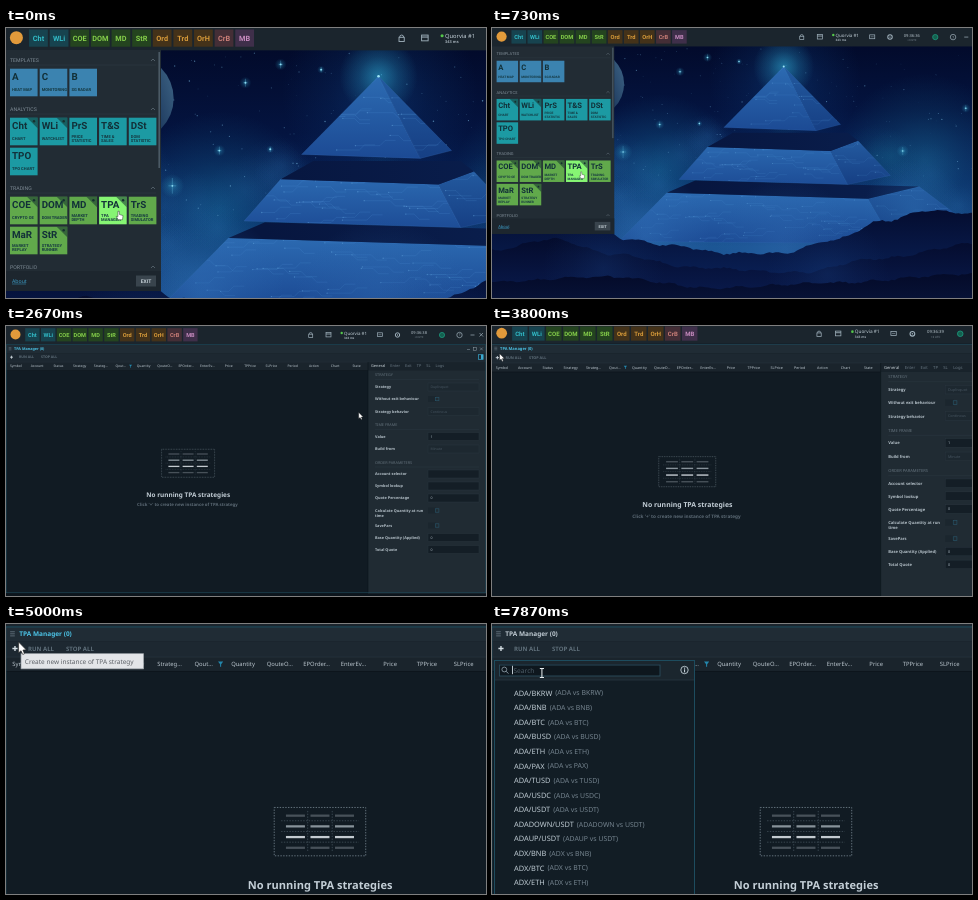
An HTML page with a canvas that plays this animation: 480 px wide and 270 px high, repeating every 8 s.

```html
<!DOCTYPE html>
<html lang="en">
<head>
<meta charset="utf-8">
<title>Trading terminal</title>
<style>
html, body { margin: 0; width: 100%; height: 100%; overflow: hidden; background: #0a1a3c; }
canvas { display: block; width: 100vw; height: 100vh; }
</style>
</head>
<body>
<canvas id="stage"></canvas>
<script>
const LOOP = 8000;
const canvas = document.getElementById('stage');
const dpr = window.devicePixelRatio || 1;
canvas.width = 480 * dpr;
canvas.height = 270 * dpr;
const ctx = canvas.getContext('2d');

// ---------- helpers ----------
const clamp = v => Math.max(0, Math.min(1, v));
const ease = v => (1 - Math.cos(Math.PI * clamp(v))) / 2;
const mix = (a, b, p) => a + (b - a) * p;
const noise = n => { const v = Math.sin(n * 127.1 + 11.7) * 43758.5453; return v - Math.floor(v); };

function rect(x, y, w, h, color) {
  ctx.fillStyle = color;
  ctx.fillRect(x, y, w, h);
}
function frame(x, y, w, h, color, width = .5) {
  ctx.strokeStyle = color;
  ctx.lineWidth = width;
  ctx.strokeRect(x, y, w, h);
}
function circle(x, y, r, fill, stroke, width = .7) {
  ctx.beginPath();
  ctx.arc(x, y, r, 0, 7);
  if (fill) { ctx.fillStyle = fill; ctx.fill(); }
  if (stroke) { ctx.strokeStyle = stroke; ctx.lineWidth = width; ctx.stroke(); }
}
function path(points, closed) {
  ctx.beginPath();
  points.forEach(([x, y]) => ctx.lineTo(x, y));
  if (closed) ctx.closePath();
}
function poly(points, fill) {
  path(points, true);
  ctx.fillStyle = fill;
  ctx.fill();
}
function line(points, color, width = .7) {
  path(points);
  ctx.strokeStyle = color;
  ctx.lineWidth = width;
  ctx.stroke();
}
function gradient(x0, y0, x1, y1, ...colors) {
  const g = ctx.createLinearGradient(x0, y0, x1, y1);
  colors.forEach((c, i) => g.addColorStop(i / (colors.length - 1), c));
  return g;
}
function glow(x, y, r, rgb, alpha) {
  const g = ctx.createRadialGradient(x, y, 0, x, y, r);
  g.addColorStop(0, `rgba(${rgb},${alpha})`);
  g.addColorStop(.5, `rgba(${rgb},${alpha * .4})`);
  g.addColorStop(1, `rgba(${rgb},0)`);
  rect(x - r, y - r, 2 * r, 2 * r, g);
}
// y is the middle of the capitals
function text(s, x, y, size, color, weight = 400, align = 'left', family = '"Noto Sans"') {
  ctx.font = `${weight} ${size}px ${family}, sans-serif`;
  ctx.textAlign = align;
  ctx.fillStyle = color;
  ctx.fillText(s, x, y + size * .36);
}
const narrow = (s, x, y, size, color, align) => text(s, x, y, size, color, '700 condensed', align, 'Roboto');

// ---------- wallpaper ----------
function ridge(points, seed, fill) {
  ctx.beginPath();
  ctx.moveTo(0, 270);
  for (let x = 0; x <= 480; x += 3) {
    const i = Math.max(1, points.findIndex(p => p[0] >= x));
    const [a, b] = [points[i - 1], points[i]];
    const y = mix(a[1], b[1], ease((x - a[0]) / (b[0] - a[0])));
    ctx.lineTo(x, y + Math.sin(x * .19 + seed) + noise(x + seed) * 1.4);
  }
  ctx.lineTo(480, 270);
  ctx.fillStyle = fill;
  ctx.fill();
}

function face(points, fill, seed) {
  poly(points, fill);
  ctx.save();
  path(points, true);
  ctx.clip();
  const xs = points.map(p => p[0]), ys = points.map(p => p[1]);
  const [x0, x1, y0, y1] = [Math.min(...xs), Math.max(...xs), Math.min(...ys), Math.max(...ys)];
  for (let i = 0; i < (x1 - x0) / 5; i++) {
    const x = mix(x0, x1, noise(seed + i)), y = mix(y0, y1, noise(seed + i + 40));
    const run = 6 + noise(seed + i + 80) * 14, step = i % 2 ? 4 : -4;
    line([[x, y], [x + run, y], [x + run + 4, y + step], [x + run + 12, y + step]], 'rgba(90,165,225,.28)', .4);
    circle(x, y, .5, 'rgba(120,190,240,.4)');
  }
  ctx.restore();
  path(points, true);
  ctx.strokeStyle = 'rgba(85,150,220,.25)';
  ctx.lineWidth = .4;
  ctx.stroke();
}

function sparkle(x, y, r) {
  glow(x, y, r * 1.5, '50,165,205', .45);
  line([[x - r / 2, y], [x + r / 2, y]], 'rgba(110,200,235,.6)', .4);
  line([[x, y - r], [x, y + r]], 'rgba(110,200,235,.6)', .4);
  circle(x, y, .7, '#8fdcf2');
}

function wallpaper() {
  rect(0, 0, 480, 270, gradient(0, 15, 0, 215, '#020a2a', '#041440', '#092a63', '#1c5594'));
  glow(425, 130, 85, '30,125,165', .4);
  glow(165, 140, 75, '25,120,165', .45);
  glow(35, 140, 100, '50,125,185', .65);
  glow(288, 50, 75, '20,85,160', .35);
  for (let i = 0; i < 36; i++)
    glow(noise(i + 50) * 480, 105 + noise(i + 150) * 85, 18 + noise(i + 250) * 22, i % 3 ? '45,115,180' : '30,135,170', .16);
  for (let i = 0; i < 200; i++)
    circle(noise(i) * 480, 18 + noise(i + 300) * 130, .2 + noise(i + 600) * .4,
      `rgba(120,185,225,${.2 + noise(i + 900) * .5})`);

  circle(97, 55, 33, gradient(68, 62, 130, 42, '#061538', '#10284f', '#3a5f80'));
  for (let i = 0; i < 70; i++) {
    const a = i * 2.4, r = Math.sqrt(i) * 3;
    circle(30 + Math.cos(a) * r, 130 + Math.sin(a) * r, .4, 'rgba(60,180,205,.45)');
  }
  [[129, 122, 6], [165, 95, 3], [185, 43, 3], [212, 29, 3], [204, 94, 2], [243, 33, 2], [404, 121, 4], [466, 79, 3]]
    .forEach(s => sparkle(...s));

  const left = (y0, y1) => gradient(0, y0, 0, y1, '#2c6bb2', '#1c4a94');
  const right = (y0, y1) => gradient(0, y0, 0, y1, '#235a9f', '#163f84');
  const shade = gradient(200, 0, 430, 0, '#07163f', '#0a2050');
  face([[172, 162], [370, 168], [395, 212], [125, 210]], left(160, 212), 1);
  face([[370, 168], [420, 156], [465, 190], [395, 212]], right(156, 206), 7);
  poly([[172, 162], [200, 150], [420, 156], [370, 168]], shade);
  face([[212, 117], [333, 121], [350, 154], [184, 149]], left(112, 158), 13);
  face([[333, 121], [360, 111], [392, 145], [350, 154]], right(111, 154), 19);
  poly([[212, 117], [237, 103], [350, 103], [360, 111], [333, 121]], shade);
  glow(287, 38, 30, '45,165,205', .6);
  face([[287, 38], [228, 98], [319, 101]], left(38, 101), 23);
  face([[287, 38], [319, 101], [343, 95]], right(38, 101), 31);
  circle(287, 38, 1, '#9fe6f5');

  glow(150, 205, 65, '50,115,185', .5);
  glow(290, 218, 70, '50,110,180', .4);
  glow(415, 180, 50, '50,120,185', .35);
  ridge([[0, 184], [60, 177], [100, 187], [130, 207], [175, 213], [230, 221], [285, 221], [335, 208], [385, 189], [430, 179], [480, 182]],
    2, gradient(0, 175, 0, 255, '#040c2e', '#0a2259'));
  ridge([[0, 218], [60, 207], [120, 222], [200, 235], [300, 240], [380, 226], [480, 211]],
    5, gradient(0, 205, 0, 270, '#040b2b', '#0a1c50'));
  glow(110, 236, 60, '25,65,130', .3);
  glow(330, 242, 60, '25,65,130', .3);
  ridge([[0, 249], [110, 244], [220, 255], [330, 250], [480, 241]], 9, gradient(0, 240, 0, 270, '#040a28', '#071338'));
}

// ---------- top bar ----------
const TEAL = ['#17434f', '#32bcc8'], GREEN = ['#24441f', '#86d04b'],
  AMBER = ['#443219', '#d99c3a'], ROSE = ['#442e36', '#cb7f78'], PLUM = ['#3f2f4a', '#c88cc0'];
const shortcuts = [['Cht', TEAL], ['WLi', TEAL], ['COE', GREEN], ['DOM', GREEN], ['MD', GREEN], ['StR', GREEN],
  ['Ord', AMBER], ['Trd', AMBER], ['OrH', AMBER], ['CrB', ROSE], ['MB', PLUM]];

function topBar(t) {
  const ink = '#9fb0bb';
  rect(0, 0, 480, 18.2, '#1b252d');
  circle(9.5, 8.5, 5, '#e29a3b');
  shortcuts.forEach(([name, [back, fore]], i) => {
    const x = 26.4 + i * 15.8;
    rect(x - 7.2, 2.2, 14.4, 13.2, back);
    narrow(name, x, 9, 5.6, fore, 'center');
  });
  frame(302.7, 8.2, 4, 3.2, ink, .7);
  ctx.beginPath(); ctx.arc(304.7, 8, 1.5, Math.PI, 0); ctx.stroke();
  frame(320, 6.5, 5, 4.4, ink, .7);
  line([[320, 8], [325, 8]], ink, .8);
  circle(335.7, 7, 1.2, '#55c64b');
  text('Quorvia #1', 338, 7, 4.4, '#c3d0d8');
  text('343 ms', 338, 11.5, 3, '#a3afb8', 600);
  frame(371.5, 6.8, 5, 3.8, ink, .7);
  line([[372.5, 8.7], [375.5, 8.7]], ink, .5);
  circle(391.5, 9, 2.2, null, ink, 1);
  circle(391.5, 9, .7, ink);
  text('09:36:' + (36 + Math.floor(Math.max(0, t - 200) / 1000)), 413, 7, 4, '#b6c3cb', 400, 'center');
  text('+3 UTC', 413, 11.5, 2.7, '#83919b', 400, 'center');
  circle(436, 9, 2.6, '#14604f', '#1da384');
  circle(453.5, 9, 2.7, null, ink);
  text('?', 453.5, 9, 4, ink, 400, 'center');
  line([[464.5, 9], [468.5, 9]], ink);
  line([[473.5, 7], [477, 10.5]], ink);
  line([[477, 7], [473.5, 10.5]], ink);
}

// ---------- start menu ----------
const menuGroups = [
  ['TEMPLATES', 32, '#3b83b0', [['A', 'HEAT MAP'], ['C', 'MONITORING'], ['B', 'SG RADAR']]],
  ['ANALYTICS', 81, '#1c9aa3', [['Cht', 'CHART', 1], ['WLi', 'WATCHLIST', 1], ['PrS', 'PRICE STATISTIC'],
    ['T&S', 'TIME & SALES'], ['DSt', 'DOM STATISTIC'], ['TPO', 'TPO CHART']]],
  ['TRADING', 160, '#61a94b', [['COE', 'CRYPTO OE', 1], ['DOM', 'DOM TRADER', 1], ['MD', 'MARKET DEPTH', 1],
    ['TPA', 'TPA MANAGER', 1], ['TrS', 'TRADING SIMULATOR'], ['MaR', 'MARKET REPLAY'], ['StR', 'STRATEGY RUNNER', 1]]],
  ['PORTFOLIO', 239, '', []]
];

function menu() {
  ctx.save();
  ctx.translate(1.53, 1.07);
  ctx.scale(1 / 1.305, 1 / 1.305);
  rect(-2, 22, 157, 241, '#222c34');
  for (const [title, y, color, tiles] of menuGroups) {
    text(title, 4, y, 5.2, '#7d8a94', 400, 'left', 'Roboto');
    line([[145, y + 1], [147, y - 1], [149, y + 1]], '#66747e');
    line([[2, y + 5], [150, y + 5]], '#303c45', .5);
    tiles.forEach(([code, label, pinned], i) => {
      const x = 4 + i % 5 * 29.7, top = y + 8.7 + Math.floor(i / 5) * 30;
      rect(x, top, 27.6, 27.6, code === 'TPA' ? '#86f573' : color);
      if (pinned) {
        poly([[x + 17, top], [x + 27.6, top], [x + 27.6, top + 10.6]], 'rgba(20,50,45,.55)');
        circle(x + 24, top + 3.6, 1.2, '#16302f');
      }
      narrow(code, x + 2, top + 8, 9.8, '#123038');
      const lines = label.length > 10 ? label.split(/ (?!&)/) : [label];
      lines.forEach((words, n) =>
        narrow(words, x + 2, top + (lines.length > 1 ? 18.5 : 21) + n * 4.6, 4.1, '#153840'));
    });
  }
  rect(152.4, 24, 1.6, 116, '#4b5a65');
  rect(-2, 243, 157, 20, '#1d262e');
  text('About', 6, 253, 5.2, '#3d9bc4');
  line([[6, 256], [20, 256]], '#3d9bc4', .5);
  rect(130, 247.5, 20, 11, '#39444d');
  narrow('EXIT', 140, 253, 5, '#c3ced5', 'center');
  ctx.restore();
}

// ---------- strategy manager window ----------
const columns = ['Symbol', 'Account', 'Status', 'Strategy', 'Strateg…', 'Qout…', 'Quantity', 'QouteO…', 'EPOrder…',
  'EnterEv…', 'Price', 'TPPrice', 'SLPrice', 'Period', 'Action', 'Chart', 'State'];
const CHECK = 'check';
const settings = [[30.5, 'STRATEGY'], [42.5, 'Strategy', 'Duplisquot'], [54.5, 'Without exit behaviour', CHECK],
  [67, 'Strategy behavior', 'Continous'], [80.5, 'TIME FRAME'], [92, 'Value', '1'], [104.5, 'Build from', 'Minute'],
  [118, 'ORDER PARAMETERS'], [129.5, 'Account selector', ''], [141.5, 'Symbol lookup', ''], [153.5, 'Quote Percentage', '0'],
  [166, 'Calculate Quantity at run', CHECK], [181, 'SavePars', CHECK], [193, 'Base Quantity (Applied)', '0'],
  [205, 'Total Quote', '0']];

function emptyState(cx, cy) {
  const x = cx - 26.6, y = cy - 32, w = 53, h = 28;
  ctx.setLineDash([.8, .8]);
  frame(x, y, w, h, '#71808a', .5);
  [1, 2, 3].forEach(i => line([[x + 4, y + 1.5 + i * 6.2], [x + w - 4, y + 1.5 + i * 6.2]], '#4b5963', .4));
  [19.4, 33.6].forEach(dx => line([[x + dx, y + 2], [x + dx, y + h - 2]], '#4b5963', .4));
  ctx.setLineDash([]);
  ['#475159', '#87929a', '#c3cad0', '#475159'].forEach((color, row) => {
    for (let col = 0; col < 3; col++) rect(x + 6.8 + col * 14.2, y + 4.1 + row * 6.2, 11, 1.3, color);
  });
  text('No running TPA strategies', cx, cy + 13, 6.4, '#c3ced6', 700, 'center');
  text("Click '+' to create new instance of TPA strategy", cx - .8, cy + 23.2, 4.35, '#5d6b76', 700, 'center');
}

function managerWindow(x, y, w, h, titleColor) {
  const panelX = x + w - 118, right = x + w, pitch = (w - 118) / columns.length;
  const wide = pitch > 10;
  ctx.save();
  ctx.beginPath();
  ctx.rect(x - .4, y - .4, w + .8, h + .8);
  ctx.clip();
  rect(x, y, w, h, '#111b23');
  rect(x, y, w, 8.7, '#202c35');
  rect(x, y + 8.7, w, 9, '#1d2831');
  rect(x, y + 17.7, w, 8.3, '#1a242c');
  line([[x, y + 17.7], [right, y + 17.7]], '#2a3741', .4);
  line([[x, y + 26], [panelX, y + 26]], '#0c141a', .5);

  [-1.2, 0, 1.2].forEach(d => line([[x + 2.7, y + 4.2 + d], [x + 5.4, y + 4.2 + d]], '#62717c', .5));
  text('TPA Manager (0)', x + 8, y + 4, 3.75, titleColor, 600);
  line([[right - 19, y + 5], [right - 16, y + 5]], '#91a0aa', .5);
  frame(right - 12.5, y + 3, 2.8, 2.8, '#91a0aa', .5);
  line([[right - 6, y + 3], [right - 3.2, y + 5.8]], '#91a0aa', .5);
  line([[right - 3.2, y + 3], [right - 6, y + 5.8]], '#91a0aa', .5);

  line([[x + 4, y + 12.7], [x + 7, y + 12.7]], '#d4dde3', .8);
  line([[x + 5.5, y + 11.2], [x + 5.5, y + 14.2]], '#d4dde3', .8);
  text('RUN ALL', x + 13, y + 12.7, 3.5, '#60707b', 600);
  text('STOP ALL', x + 35, y + 12.7, 3.5, '#60707b', 600);
  frame(right - 7.5, y + 10.2, 4.6, 4.6, '#3aa9cf', .7);
  rect(right - 5, y + 10.2, 2.1, 4.6, '#3aa9cf');

  columns.forEach((name, i) =>
    text(wide ? name : name[0], x + (i + (i === 5 ? .39 : .46)) * pitch, y + 21.6, 3.4, '#bac5cd', 400, 'center'));
  const fx = x + 5.85 * pitch, fy = y + 20.3;
  if (wide) poly([[fx - 1.5, fy], [fx + 1.5, fy], [fx + .3, fy + 1.5], [fx + .3, fy + 3], [fx - .3, fy + 3], [fx - .3, fy + 1.5]], '#2387ad');
  emptyState(x + (w - 118) / 2 + 1.2, y + 12.5 + h / 2);

  rect(panelX, y + 17.7, 118, h, '#202b33');
  rect(panelX, y + 17.7, 118, 8.3, '#19232b');
  let tabX = panelX + 3;
  ['General', 'Enter', 'Exit', 'TP', 'SL', 'Logs'].forEach((tab, i) => {
    text(tab, tabX, y + 21.5, 3.9, i ? '#687782' : '#ccd6dc');
    tabX += ctx.measureText(tab).width + 5;
  });
  for (const [dy, label, value] of settings) {
    if (dy > h - 12) break;
    const ry = y + dy;
    if (value === undefined) {
      text(label, panelX + 7, ry, 3.8, '#65737d');
      line([[panelX + 7, ry + 4.5], [right - 7, ry + 4.5]], '#2d3942', .4);
      continue;
    }
    text(label, panelX + 7, ry, 3.8, '#b4c0c8', 600);
    if (label.startsWith('Calculate')) text('time', panelX + 7, ry + 5, 3.8, '#b4c0c8', 600);
    if (value === CHECK) {
      rect(panelX + 60, ry - 3, 8, 6, '#1b262e');
      frame(panelX + 67.5, ry - 1.7, 3.4, 3.4, '#28556a', .6);
    } else {
      const active = value.length < 2;
      rect(panelX + 60, ry - 4, 51, 8, active ? '#141e26' : '#1d2830');
      frame(panelX + 60, ry - 4, 51, 8, '#2a3740', .4);
      text(value, panelX + 62.5, ry, 3.5, active ? '#aab7c0' : '#46545f');
    }
  }
  line([[panelX, y + 17.7], [panelX, y + h]], '#0d161c', .6);
  frame(x + .2, y + .2, w - .4, h - .4, '#1d4c5e', .6);
  ctx.restore();
}

function tooltip() {
  rect(9, 34.2, 71, 8.8, '#e3e5e8');
  frame(9, 34.2, 71, 8.8, '#9aa0a6', .4);
  text('Create new instance of TPA strategy', 11.2, 38.7, 3.75, '#5c6066');
}

// ---------- symbol picker, in stage pixels ----------
const pairs = ['BKRW', 'BNB', 'BTC', 'BUSD', 'ETH', 'PAX', 'TUSD', 'USDC', 'USDT'].map(q => ['ADA', q])
  .concat([['ADADOWN', 'USDT'], ['ADAUP', 'USDT'], ['ADX', 'BNB'], ['ADX', 'BTC'], ['ADX', 'ETH']]);

function symbolPicker(caret) {
  rect(2, 36, 200.5, 234, '#121d25');
  rect(2, 36, 200.5, 20, '#1b262e');
  line([[2, 56], [202, 56]], '#26353f', .8);
  frame(2.5, 36.5, 200, 240, '#1d4c5e', 1);
  rect(7, 40.5, 161, 11.5, '#0e171e');
  frame(7.5, 41, 160.5, 11, '#2b4c5c', .9);
  circle(12.3, 45.5, 2.4, null, '#8796a0', .9);
  line([[14, 47.2], [16.4, 49.6]], '#8796a0', 1);
  text('Search', 21.5, 46.3, 6.6, '#4e5d68');
  if (caret) rect(20, 41.8, .9, 8.4, '#d0dae0');
  circle(192.5, 46, 3.7, null, '#c2ced6', .9);
  rect(192, 45.3, 1.1, 3, '#c2ced6');
  rect(192, 43.6, 1.1, 1.1, '#c2ced6');
  pairs.forEach(([base, quote], i) => {
    const y = 69 + i * 14.58, name = `${base}/${quote}`;
    text(name, 22, y, 7.4, '#c0ccd4');
    text(`(${base} vs ${quote})`, 22 + ctx.measureText(name).width + 3, y, 6.9, '#74838e');
  });
}

// ---------- pointer ----------
const pointerKeys = [[900, 88, 143], [1560, 323.3, 82.5], [2200, 323.3, 82.5], [2650, 353.5, 86.3],
  [3050, 240, 102], [3450, 38, 38], [3680, 7.6, 27.5], [7500, 7.6, 27.5], [7720, 29.2, 45.4]];

function pointerAt(t) {
  const next = pointerKeys.findIndex(k => k[0] > t);
  if (next <= 0) return pointerKeys.at(next).slice(1);
  const a = pointerKeys[next - 1], b = pointerKeys[next];
  const p = ease((t - a[0]) / (b[0] - a[0]));
  return [mix(a[1], b[1], p), mix(a[2], b[2], p)];
}

function pointer(t) {
  const [x, y] = pointerAt(t);
  ctx.save();
  ctx.translate(x, y);
  let shape = [[0, 0], [0, 6.2], [1.4, 5], [2.4, 7.2], [3.4, 6.8], [2.5, 4.6], [4.4, 4.5]];
  if (t < 980) shape = [[-.7, -1.5], [.3, -1.5], [.5, 1], [3.2, 1.8], [2.8, 5], [-.5, 5], [-2, 2.4], [-.7, 2.6]];
  if (t > 7620) {
    line([[-1.2, -2.6], [1.2, -2.6]], '#e6ecef', .6);
    line([[0, -2.6], [0, 2.6]], '#e6ecef', .6);
    line([[-1.2, 2.6], [1.2, 2.6]], '#e6ecef', .6);
  } else {
    poly(shape, '#fff');
    ctx.strokeStyle = '#222';
    ctx.lineWidth = .35;
    ctx.stroke();
  }
  ctx.restore();
}

// ---------- timeline ----------
function camera(t) {
  if (t < 2000) {
    const p = 1 - ease(t / 861);
    return { scale: 1 + .305 * p, x: 1.53 * p, y: 1.07 * p };
  }
  const p = ease((t - 3530) / 1300);
  return { scale: 1 + .727 * p, x: .3 * p + 1.5 * Math.sin(Math.PI * p), y: 17.02 * p };
}

function draw(t) {
  const view = camera(t), maximized = t >= 2150;
  const picker = clamp((t - 6380) / 160);
  ctx.setTransform(dpr, 0, 0, dpr, 0, 0);
  ctx.textRendering = 'geometricPrecision';
  rect(0, 0, 480, 270, '#0c141b');
  ctx.scale(view.scale, view.scale);
  ctx.translate(-view.x, -view.y);

  if (!maximized) wallpaper();
  topBar(t);
  if (t < 980) menu();
  if (maximized) managerWindow(0, 18.5, 480, 248.5, picker ? '#bfcad2' : '#4cc3e6');
  else if (t >= 1150) managerWindow(131, 83, 237, 125, '#4cc3e6');
  if (t > 3950 && t < 6380) tooltip();
  if (picker) {
    ctx.save();
    ctx.setTransform(dpr, 0, 0, dpr, 0, 0);
    ctx.globalAlpha = picker;
    symbolPicker(t >= 7870);
    ctx.restore();
  }
  pointer(t);
}

const start = performance.now();
function tick() {
  draw((performance.now() - start) % LOOP);
  requestAnimationFrame(tick);
}
tick();
</script>
</body>
</html>
```
